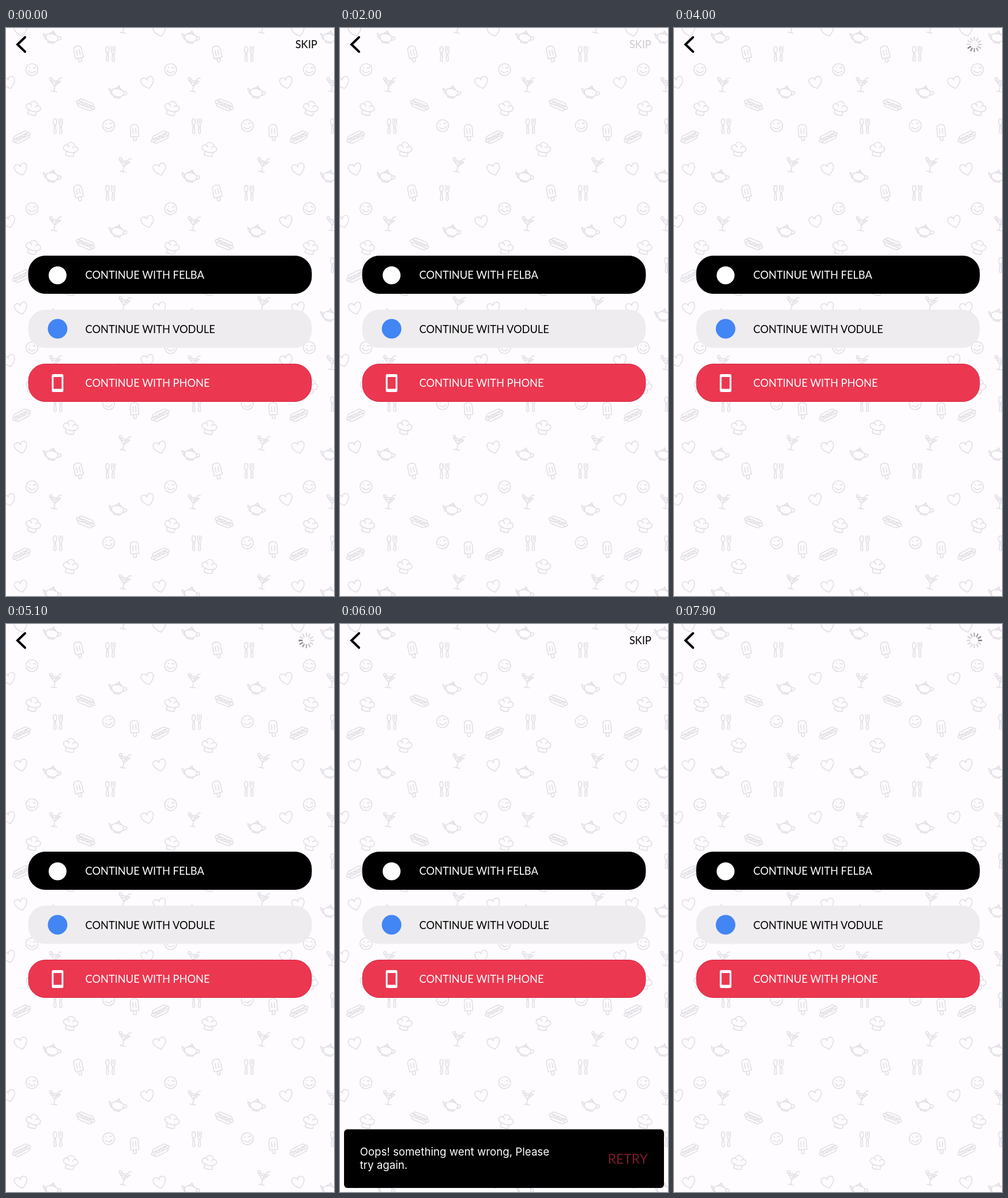
Recreate the animation shown at these times as an HTML page. Size 569x983 px, loop 8000 ms.

```html
<!DOCTYPE html>
<html lang="en">
<head>
<meta charset="utf-8">
<title>Sign in</title>
<style>
  html, body { margin: 0; width: 100%; height: 100%; overflow: hidden; background: #fefcff; }
  svg { display: block; width: 100vw; height: 100vh; }
  text { font-family: Lato, sans-serif; font-size: 18.25px; }
  .message { font-family: Inter, sans-serif; font-size: 18.7px; fill: #fff; }
  #wallpaper { fill: none; stroke: #e1dfe4; stroke-width: 1.6; stroke-linecap: round; stroke-linejoin: round; }
</style>
</head>
<body>
<svg viewBox="0 0 569 983">
  <defs>
    <path id="heart" d="M0 11C-15 1 -12 -9 -6 -9Q-1 -9 0 -4Q1 -9 6 -9C12 -9 15 1 0 11Z"/>
    <path id="smile" d="M-10.3 0A10.3 10.3 0 1 1 10.3 0A10.3 10.3 0 1 1 -10.3 0ZM-6 2Q0 9 6 2M-4 -4v1M2 -3q2 -2 4 0"/>
    <path id="pop" d="M-7 7V-7Q-7 -14 0 -14T7 -7V7ZM-2.5 7V13Q0 15 2.5 13V7M-2.5 -7V2M2.5 -7V2"/>
    <path id="cutlery" d="M-5 -13C-9 -13 -9 -3 -5 -2C-1 -3 -1 -13 -5 -13ZM-6 -2L-7 11Q-5 15 -3 11L-4 -2
      M2 -13V-5Q2 -2 4 -1L3 11Q5 15 7 11L6 -1Q8 -2 8 -5V-13M5 -13V-5"/>
    <path id="teapot" d="M-10 -2C-12 6 -7 9 0 9S12 6 10 -2Q0 -8 -10 -2ZM-6 -4Q0 -11 6 -4M-1 -8Q0 -13 2 -8
      M-10 4Q-12 -2 -16 -3L-15 0Q-12 6 -8 7M10 -1C17 -5 19 3 9 5M-6 9L-5 11H5L6 9"/>
    <path id="cocktail" d="M-10 -7H9L0 3ZM-7 -4H6M0 3V12M-5 12H5M0 0L6 -12L10 -13M-10 -7Q-13 -12 -7 -11L-5 -7"/>
    <path id="hotdog" d="M-14 -2Q-13 -7 -9 -7H9Q13 -7 14 -2M-14 2Q-13 7 -9 7H9Q13 7 14 2
      M-15 -2.5H15Q19 0 15 2.5H-15Q-19 0 -15 -2.5ZM-12 0l4 -1l4 2l4 -2l4 2l4 -2l4 1"/>
    <path id="hat" d="M-7 4C-16 2 -13 -8 -7 -6C-6 -14 6 -14 7 -6C13 -8 16 2 7 4L7 11Q0 13 -7 11ZM-7 4Q0 7 7 4M-7 -6Q-4 -6 -3 -3M7 -6Q4 -6 3 -3"/>
  </defs>

  <g id="wallpaper"></g>
  <path d="M33 16L20 28.5L33 41" fill="none" stroke="#000" stroke-width="4" stroke-linecap="round"/>
  <text id="skip" x="540" y="35" text-anchor="end">SKIP</text>
  <g id="spinner" transform="translate(521 28.5)" stroke="#77757b" stroke-width="2.3" stroke-linecap="round"></g>

  <g id="buttons"></g>
  <circle cx="89.5" cy="428" r="15.5" fill="#fff"/>
  <circle cx="89.5" cy="520.5" r="17" fill="#4285f4"/>
  <path d="M82 599H97Q99.500 599 99.500 601.500V627.500Q99.500 630 97 630H82Q79.500 630 79.500 627.500V601.500Q79.500 599 82 599ZM82.500 604V624.500H96.500V604Z" fill="#fff" fill-rule="evenodd"/>

  <g id="snackbar">
    <rect x="7" y="874.5" width="555" height="101.5" rx="6"/>
    <text class="message" x="34.500" y="920">Oops! something went wrong, Please</text>
    <text class="message" x="34.500" y="943">try again.</text>
    <text id="retry" x="534" y="934" text-anchor="end" fill="#7b1a2a" style="font-size:23px">RETRY</text>
  </g>
</svg>
<script>
const LOOP = 8000, STEP = 100, TILE = 240.6, SPOKES = 12;
const $ = id => document.getElementById(id);

// shape, x, y, rotation
const icons = [
  ['teapot', 80, 15, 10], ['pop', 126, 45, -13], ['cutlery', 181, 45, 0], ['smile', 45, 72, 5],
  ['heart', 5, 94, -14], ['cocktail', 85, 98, 8], ['teapot', 194, 110, 10], ['hotdog', 138, 133, 22],
  ['hat', 47, 139, 14], ['cutlery', 90, 170, 0], ['smile', 178, 169, -8], ['pop', 223, 181, -4],
  ['hotdog', 27, 189, -26], ['hat', 112, 210, 10], ['cocktail', 205, 237, 12], ['heart', 26, 244, -14]
];
let wallpaper = '';
for (let row = -1; row < 5; row++)
  for (let col = -1; col < 3; col++)
    for (const [shape, x, y, turn] of icons)
      wallpaper += `<use href="#${shape}" transform="translate(${x + col * TILE} ${y + row * TILE}) rotate(${turn})"/>`;
$('wallpaper').innerHTML = wallpaper;

$('buttons').innerHTML = [
  ['FELBA', '#000', '#000', '#fff'],
  ['VODULE', '#eeecee', '#eeecee', '#000'],
  ['PHONE', '#ec3750', '#d42443', '#fff']
].map(([name, fill, edge, ink], i) => {
  const y = 394.5 + i * 93.5;
  return `<rect x="39" y="${y}" width="491" height="65" rx="29" fill="${fill}" stroke="${edge}"/>
    <text x="137.500" y="${y + 39.5}" fill="${ink}">CONTINUE WITH ${name}</text>`;
}).join('');

$('spinner').innerHTML = Array.from({ length: SPOKES }, (_, i) =>
  `<path d="M0 -7.500V-12.500" transform="rotate(${i * 360 / SPOKES})"/>`).join('');
const spokes = [...$('spinner').children];

const progress = (t, start, length) => Math.min(1, Math.max(0, (t - start) / length));
const within = (t, start, end) => t >= start && t < end;

function spin(t, time, head) {
  const lead = head + Math.floor((t - time) * SPOKES / 1000);
  spokes.forEach((spoke, i) => {
    const age = (((lead - i) % SPOKES) + SPOKES) % SPOKES;
    spoke.setAttribute('opacity', Math.max(0.25, 0.95 - age * 0.13));
  });
}

function draw(now) {
  const t = Math.floor(now % LOOP / STEP) * STEP;
  const firstLoad = within(t, 2200, 5200), secondLoad = t >= 7500;
  const loading = firstLoad || secondLoad;

  $('skip').style.display = loading ? 'none' : '';
  $('skip').setAttribute('opacity', within(t, 2000, 2200) ? 0.2 : 1);
  $('spinner').style.display = loading ? '' : 'none';
  if (firstLoad) spin(t, 4000, 8);
  if (secondLoad) spin(t, 7900, 3);

  const enter = (1 - progress(t, 5200, 500)) ** 3;
  const leave = progress(t, 7450, 250) ** 2;
  $('snackbar').setAttribute('transform', `translate(0 ${109 * (enter + leave)})`);
  $('retry').setAttribute('opacity', 1 - 0.8 * progress(t, 7100, 150));
  requestAnimationFrame(() => draw(performance.now()));
}
draw(performance.now());
</script>
</body>
</html>
```
